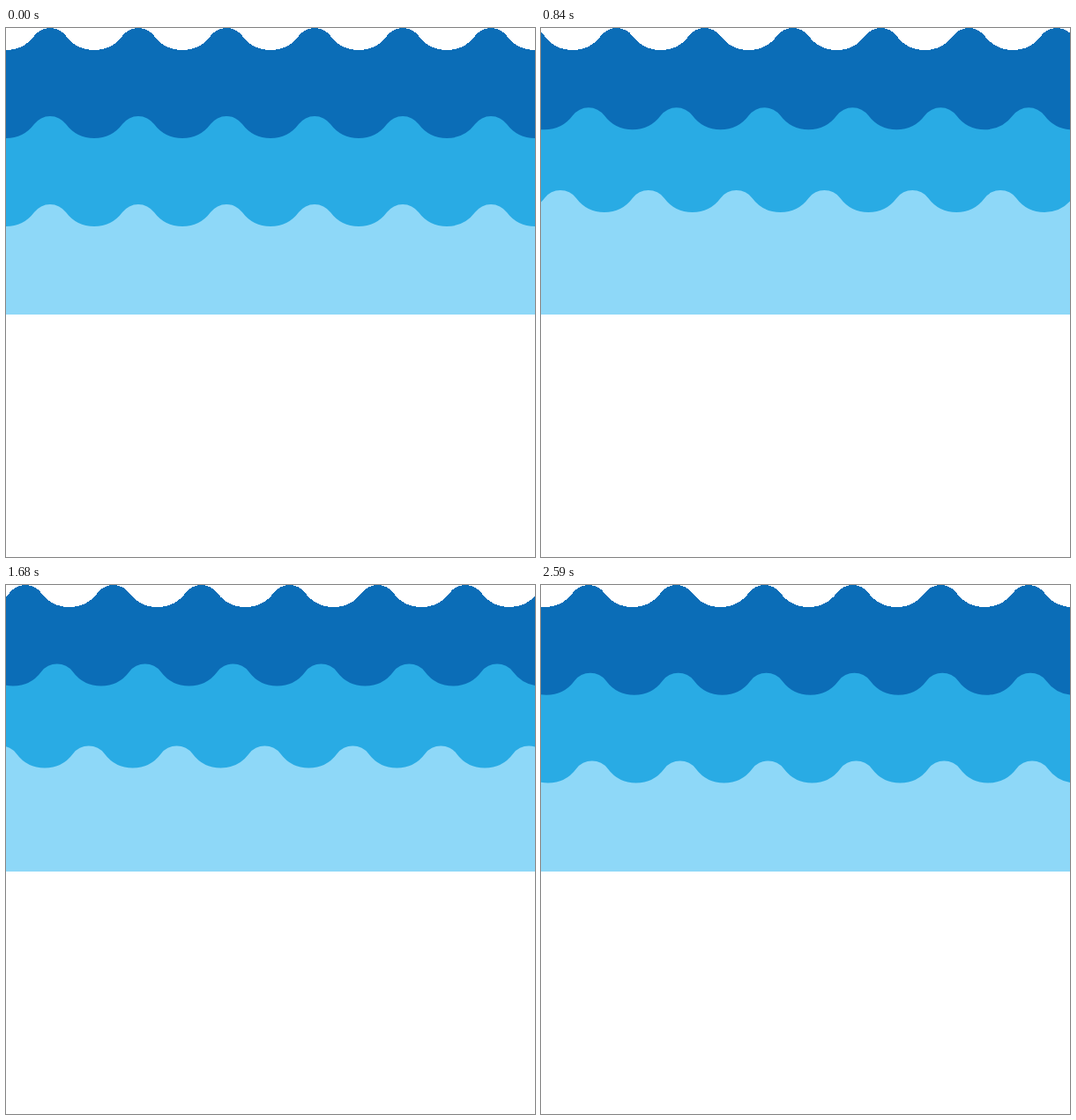
Recreate the animation shown at these times as an HTML page. Size 600 by 600 pixels, loop 2620 ms.

```html
<!DOCTYPE html>
<html lang="en">
<head>
<meta charset="utf-8">
<title>Waves</title>
<style>
  html, body { margin: 0; width: 100%; height: 100%; overflow: hidden; background: #fff; }
  svg { display: block; width: 600px; height: 600px; }
</style>
</head>
<body>
<svg viewBox="0 0 600 600">
  <clipPath id="sea"><rect width="600" height="325"/></clipPath>
  <g id="layers" clip-path="url(#sea)"></g>
</svg>
<script>
  const NS = 'http://www.w3.org/2000/svg';
  const LOOP = 2620, TICK = 70, STEPS = 50, PERIOD = 100;

  // y: crest height, dx: pixels per step, lift: highest rise
  const layers = [
    { y: 0, dx: 4, lift: 0, color: '#0b6db7' },
    { y: 100, dx: 6, lift: 12, color: '#29abe4' },
    { y: 200, dx: 8, lift: 20, color: '#8ed8f8' }
  ];

  // Tangent arcs: crest radius 22.5, trough radius 40
  const crest = 'a40 40 0 0 0 32 -16 a22.5 22.5 0 0 1 36 0 a40 40 0 0 0 32 16 ';
  const wave = 'M0 25 ' + crest.repeat(8) + 'V400 H0 Z';

  const group = document.getElementById('layers');
  for (const layer of layers) {
    layer.path = document.createElementNS(NS, 'path');
    layer.path.setAttribute('d', wave);
    layer.path.setAttribute('fill', layer.color);
    if (!layer.y) layer.path.setAttribute('shape-rendering', 'crispEdges');
    group.append(layer.path);
  }

  function draw(time) {
    const tick = Math.floor(time % LOOP / TICK) * TICK;
    const step = Math.floor(tick * STEPS / LOOP);
    const rise = Math.sin(Math.PI * step / STEPS) ** 1.3;
    const scale = step ? 599 / 600 : 1;
    for (const { path, y, dx, lift } of layers) {
      const x = -(step * dx % PERIOD);
      path.setAttribute('transform', `scale(${scale} 1) translate(${x} ${y - lift * rise})`);
    }
  }

  const start = performance.now();
  function loop() {
    draw(performance.now() - start);
    requestAnimationFrame(loop);
  }
  loop();
</script>
</body>
</html>
```
